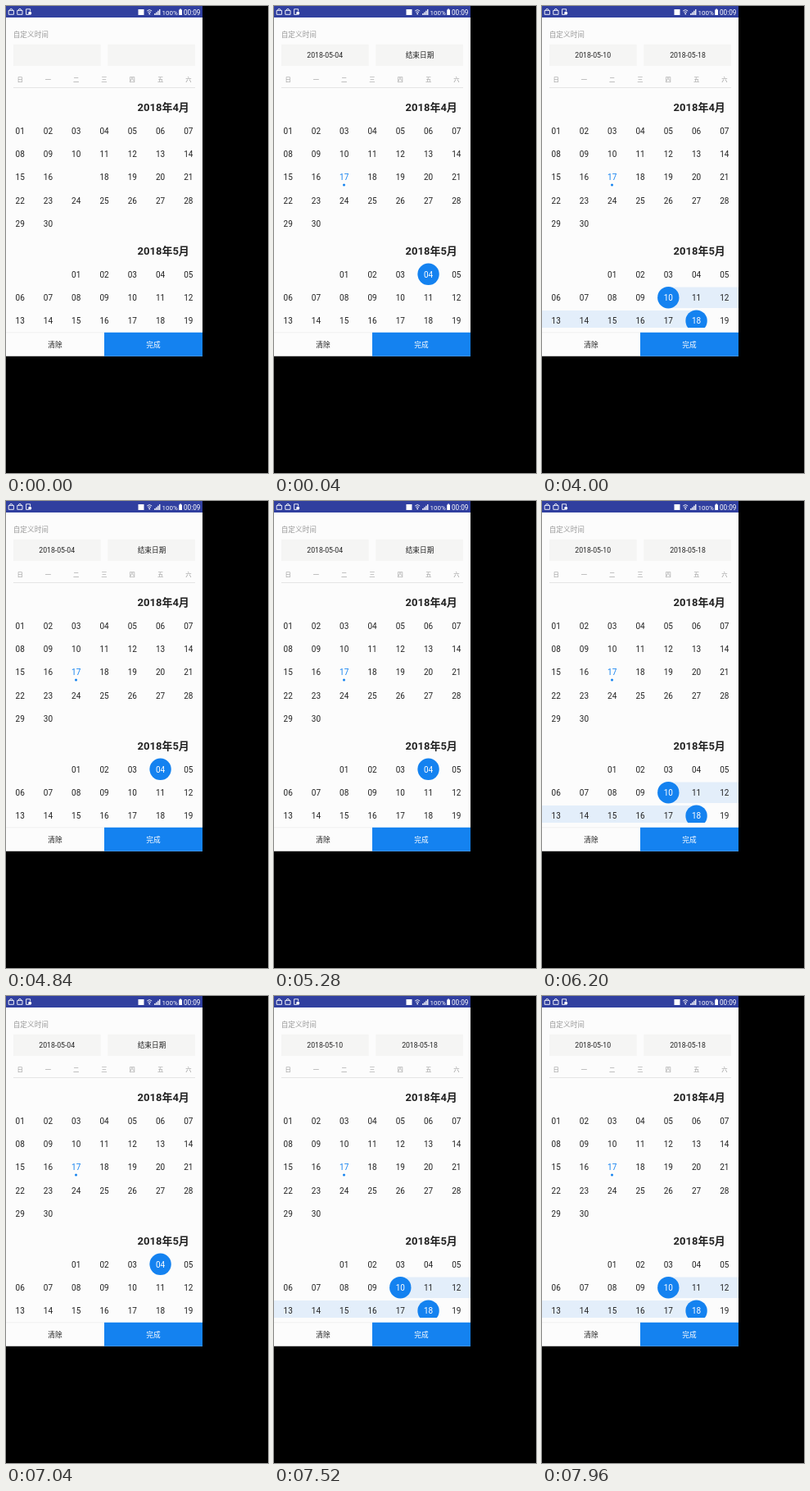
These frames come from a looping animation (320x569 px, 8 s). An HTML page:

```html
<!DOCTYPE html>
<html lang="zh-CN">
<head>
<meta charset="utf-8">
<title>日期范围</title>
<style>
html, body { margin: 0; width: 100%; height: 100%; overflow: hidden; background: #000; }
svg { display: block; width: 320px; height: 569px; }
text { font-family: Roboto, "Noto Sans CJK SC", "Noto Sans CJK", sans-serif; font-size: 8.67px; text-anchor: middle; fill: #222; }
.day { font-size: 10px; }
.title { font-size: 13px; font-weight: 700; }
.week { font-size: 7.33px; fill: #999; }
.start { text-anchor: start; }
.gray { fill: #999; }
.blue { fill: #1482f0; }
.white { fill: #fff; }
.band { fill: #e3eefa; }
.box { fill: #f5f5f4; }
.icon { fill: none; stroke: #fff; stroke-width: .9; }

.initial, .today, .single, .range { opacity: 0; animation: 8s step-end infinite; }
.initial { animation-name: initial; }
.today { animation-name: today; }
.single { animation-name: single; }
.range { animation-name: range; }
@keyframes initial { 0% { opacity: 1 } .5%, 100% { opacity: 0 } }
@keyframes today { 0% { opacity: 0 } .5%, 100% { opacity: 1 } }
@keyframes single {
  0%, 50%, 55.5%, 61%, 66.5%, 72%, 77.5%, 83%, 88.5%, 94%, 99.5%, 100% { opacity: 0 }
  .5%, 55%, 60.5%, 66%, 71.5%, 77%, 82.5%, 88%, 93.5%, 99% { opacity: 1 }
}
@keyframes range {
  0%, 55%, 60.5%, 66%, 71.5%, 77%, 82.5%, 88%, 93.5%, 99% { opacity: 0 }
  50%, 55.5%, 61%, 66.5%, 72%, 77.5%, 83%, 88.5%, 94%, 99.5%, 100% { opacity: 1 }
}
</style>
</head>
<body>
<svg viewBox="0 0 320 569">
  <defs><clipPath id="list"><path d="M0 100H240V391.3H0z"/></clipPath></defs>
  <path fill="#fcfcfc" d="M0 0H240V426.7H0z"/>

  <!-- status bar -->
  <path fill="#303f9f" d="M0 0H240V14H0z"/>
  <g class="icon">
    <path id="bag" d="M3.2 5.4H9.4V10.3H3.2zM4.6 5.2Q4.8 3.4 6.3 3.4T8 5.2"/>
    <use href="#bag" x="10.6"/>
    <path d="M28 10.4H24.6V3.8H29.6V6.4"/>
  </g>
  <circle class="white" cx="29.2" cy="8.8" r="2"/>
  <path class="white" d="M161.5 4H168.5V11H161.5z"/>
  <path class="icon" d="M172.2 6Q175.2 3.1 178.2 6M173.4 7.7Q175.2 6.1 177 7.7"/>
  <path class="white" d="M174 8.9Q175.2 8 176.4 8.9L175.2 10.8zM181.2 11V9H182.6V11zM183.2 11V7.6H184.6V11zM185.2 11V5.8H186.6V11zM187.1 11V4H188.4V11z"/>
  <text class="white" x="200.1" y="10.5" style="font-size:8px">100%</text>
  <path class="white" d="M211.2 4.6H212.2V3.6H214V4.6H215V11H211.2z"/>
  <text class="white" x="227.2" y="10.5" style="font-size:8.2px">00:09</text>

  <!-- header -->
  <text class="gray start" x="8.7" y="38.2">自定义时间</text>
  <path class="box" d="M9 46.7H115.7V73H9zM124.3 46.7H231V73H124.3z"/>
  <path fill="#dedede" d="M9 99H231V99.7H9z"/>

  <g class="range" clip-path="url(#list)">
    <path class="band" d="M154.3 342.5H240V368H154.3zM0 371H188.6V396.5H0z"/>
  </g>
  <g id="days"></g>

  <g class="initial">
    <text x="62.2" y="63.1">起始日期</text>
    <text x="178" y="63.1">2018-04-17 <tspan class="gray">今天</tspan></text>
    <g data-mark="2 208.6 17"></g>
  </g>
  <g class="today">
    <text class="day blue" x="85.7" y="212.4">17</text>
    <circle class="blue" cx="85.5" cy="218" r="1.5"/>
  </g>
  <g class="single">
    <text x="62.2" y="63.1">2018-05-04</text>
    <text x="178" y="63.1">结束日期</text>
    <g data-mark="5 326.8 04"></g>
  </g>
  <g class="range">
    <text x="62.2" y="63.1">2018-05-10</text>
    <text x="178" y="63.1">2018-05-18</text>
    <g clip-path="url(#list)">
      <g data-mark="4 355.2 10"></g>
      <g data-mark="5 383.7 18"></g>
    </g>
  </g>

  <!-- buttons -->
  <path fill="#ececec" d="M0 397.6H120V398.2H0z"/>
  <path class="blue" d="M120 397.7H240V426.7H120z"/>
  <text x="60" y="415.6">清除</text>
  <text class="white" x="180" y="415.6">完成</text>
</svg>
<script>
const NS = 'http://www.w3.org/2000/svg';
const days = document.getElementById('days');
const colX = col => 240 / 7 * (col + .5);

function add(parent, tag, attrs, text = '') {
  const el = document.createElementNS(NS, tag);
  for (const key in attrs) el.setAttribute(key, attrs[key]);
  el.textContent = text;
  parent.append(el);
}

function label(parent, cls, x, y, text) {
  add(parent, 'text', { class: cls, x, y }, text);
}

// top is the middle of the first week row
function month(name, first, count, top, skip) {
  label(days, 'title', 192.2, top - 23.7, name);
  for (let d = 1; d <= count; d++) {
    if (d === skip) continue;
    const cell = first + d - 1;
    const y = top + 28.45 * Math.floor(cell / 7) + 3.7;
    label(days, 'day', colX(cell % 7), y, String(d).padStart(2, '0'));
  }
}

[...'日一二三四五六'].forEach((c, i) => label(days, 'week', colX(i), 91.7, c));
month('2018年4月', 0, 30, 151.8, 17);
month('2018年5月', 2, 19, 326.8);

for (const g of document.querySelectorAll('[data-mark]')) {
  const [col, y, text] = g.dataset.mark.split(' ');
  add(g, 'circle', { class: 'blue', cx: colX(+col), cy: y, r: 13.2 });
  label(g, 'day white', colX(+col), +y + 3.7, text);
}
</script>
</body>
</html>
```
